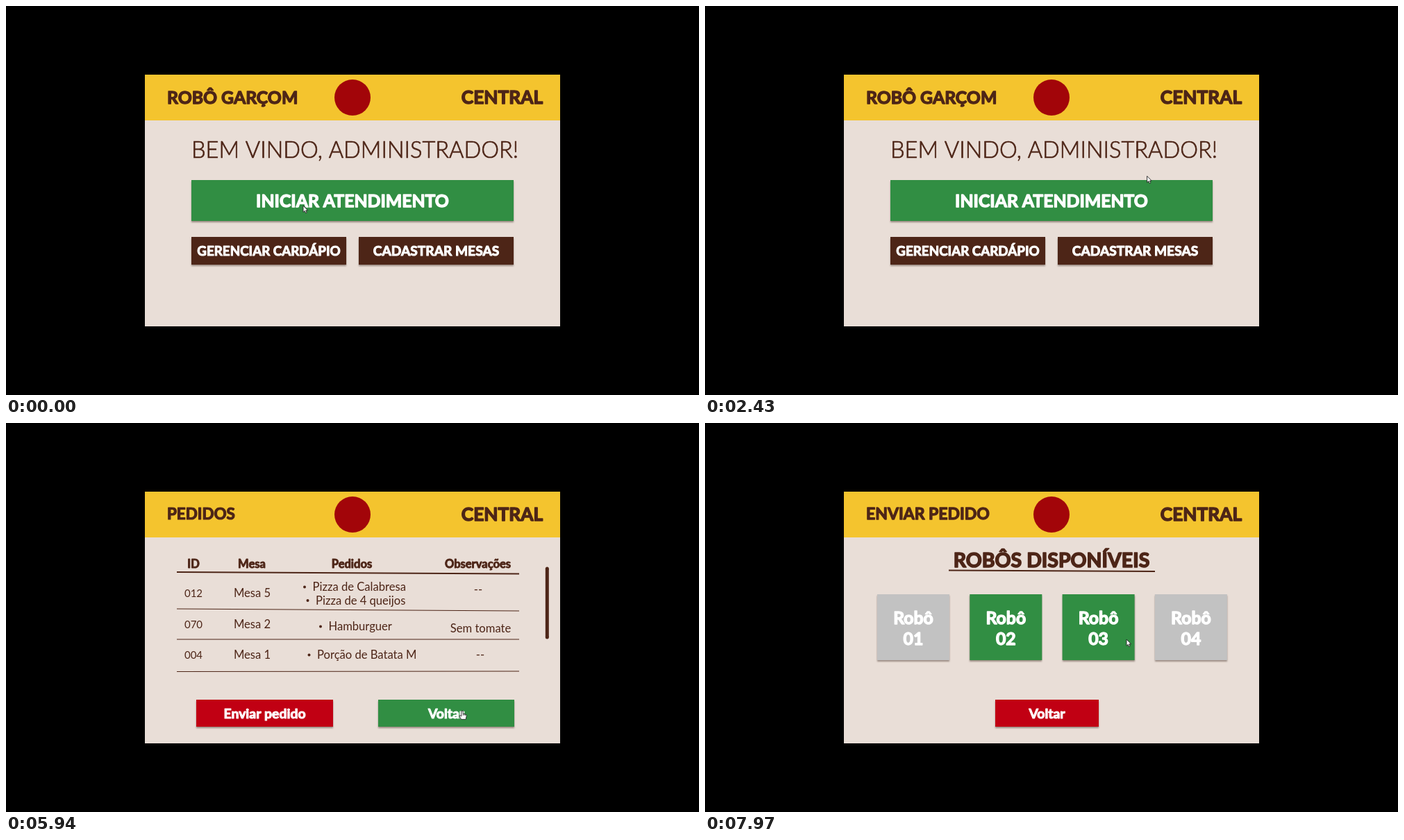
An HTML page with a canvas for the animation above (8 s loop, 998 by 561 pixels).

```html
<!DOCTYPE html>
<html lang="pt">
<head>
<meta charset="utf-8">
<title>Central</title>
<style>
html, body { margin: 0; width: 100%; height: 100%; overflow: hidden; background: #000; }
canvas { display: block; width: 100vw; height: 100vh; }
</style>
</head>
<body>
<canvas id="stage" width="998" height="561"></canvas>
<script>
const ctx = document.getElementById('stage').getContext('2d');
const LOOP = 8000, ORDERS_AT = 4000, ROBOTS_AT = 7460;
const GOLD = '#f4c42e', CREAM = '#e9ded7', GREEN = '#318e43', BROWN = '#4d2517',
      RED = '#c10013', GRAY = '#c2c2c2', DARK_RED = '#a20509', WHITE = '#fff';

// Places where the pointer rests or turns; it eases between them
const STOPS = [
  { t: 300, x: 428, y: 288 },
  { t: 1400, x: 937, y: 167 },
  { t: 3100, x: 480, y: 286 },
  { t: 4600, x: 477, y: 286 },
  { t: 5900, x: 657, y: 415 },
  { t: 6300, x: 657, y: 415 },
  { t: 7350, x: 402, y: 420 },
  { t: 7550, x: 402, y: 420 },
  { t: 7970, x: 607, y: 312 }
];

function bold(str, x, y, size, color = BROWN, align = 'center') {
  ctx.font = `700 ${size}px Lato, sans-serif`;
  ctx.textAlign = align;
  ctx.fillStyle = ctx.strokeStyle = color;
  ctx.lineWidth = size * 0.055;
  ctx.lineJoin = 'round';
  ctx.strokeText(str, x, y);
  ctx.fillText(str, x, y);
}

function plain(str, x, y, align = 'center', size = 16.6) {
  ctx.font = `400 ${size}px Lato, sans-serif`;
  ctx.textAlign = align;
  ctx.fillStyle = BROWN;
  ctx.fillText(str, x, y);
}

function box(x, y, w, h, color) {
  ctx.save();
  ctx.shadowColor = 'rgba(60, 40, 30, .45)';
  ctx.shadowBlur = 2;
  ctx.shadowOffsetY = 2;
  ctx.fillStyle = color;
  ctx.fillRect(x, y, w, h);
  ctx.restore();
}

function button(label, x, y, w, h, color, size = 19.4) {
  box(x, y, w, h, color);
  bold(label, x + w / 2, y + h / 2 + size * 0.37, size, WHITE);
}

function line(x1, y1, x2, y2, width) {
  ctx.strokeStyle = BROWN;
  ctx.lineWidth = width;
  ctx.beginPath();
  ctx.moveTo(x1, y1);
  ctx.lineTo(x2, y2);
  ctx.stroke();
}

function dot(x, y, r, color) {
  ctx.fillStyle = color;
  ctx.beginPath();
  ctx.arc(x, y, r, 0, Math.PI * 2);
  ctx.fill();
}

function frame(title, size, baseline) {
  ctx.fillStyle = '#000';
  ctx.fillRect(0, 0, 998, 561);
  ctx.fillStyle = CREAM;
  ctx.fillRect(200, 99, 598, 363);
  ctx.fillStyle = GOLD;
  ctx.fillRect(200, 99, 598, 66);
  dot(499, 132, 26, DARK_RED);
  bold(title, 232, baseline, size, BROWN, 'left');
  bold('CENTRAL', 714.5, 141, 26.3);
}

function welcome(str, x, y) {
  ctx.font = '300 32.6px Lato, sans-serif';
  ctx.textAlign = 'center';
  ctx.fillStyle = ctx.strokeStyle = BROWN;
  ctx.lineWidth = 0.7;
  ctx.fillText(str, x, y);
  ctx.strokeText(str, x, y);
}

function home() {
  frame('ROBÔ GARÇOM', 24.8, 141);
  welcome('BEM VINDO, ADMINISTRADOR!', 502.5, 219);
  button('INICIAR ATENDIMENTO', 267, 251, 464, 59, GREEN, 24.8);
  button('GERENCIAR CARDÁPIO', 267, 333, 223, 40, BROWN, 18.8);
  button('CADASTRAR MESAS', 508, 333, 223, 40, BROWN, 19.2);
}

function row(id, table, y) {
  plain(id, 270, y, 'center', 15);
  plain(table, 354.5, y);
}

function item(str, x, y) {
  dot(x - 11.5, y - 5.5, 2, BROWN);
  plain(str, x, y, 'left');
}

function orders() {
  frame('PEDIDOS', 22.4, 139);
  bold('ID', 270, 208.5, 16.5);
  bold('Mesa', 354, 208.5, 16.5);
  bold('Pedidos', 498, 208.5, 16.5);
  bold('Observações', 679.5, 208.5, 16.5);
  line(246, 215, 739, 217.5, 2);
  line(246, 268, 739, 271, 1.2);
  line(246, 312, 739, 312, 1.2);
  line(246, 358.5, 739, 358, 1.2);

  row('012', 'Mesa 5', 251);
  item('Pizza de Calabresa', 441.5, 242);
  item('Pizza de 4 queijos', 446, 261.5);
  plain('--', 680, 246);

  row('070', 'Mesa 2', 296);
  item('Hamburguer', 464.5, 299);
  plain('Sem tomate', 683.5, 302);

  row('004', 'Mesa 1', 340);
  item('Porção de Batata M', 448, 340);
  plain('--', 683, 340);

  line(779.3, 210, 779.3, 309, 5);
  dot(779.3, 210, 2.5, BROWN);
  dot(779.3, 309, 2.5, BROWN);

  button('Enviar pedido', 274, 399, 197, 39, RED);
  button('Voltar', 536, 399, 196, 39, GREEN);
}

function robots() {
  frame('ENVIAR PEDIDO', 23, 139);
  bold('ROBÔS DISPONÍVEIS', 499, 208, 28.5);
  line(351, 212.5, 648, 214, 2);
  for (let i = 0; i < 4; i++) {
    const x = 248 + i * 133.3, busy = i % 3 === 0;
    box(x, 247, 104, 95, busy ? GRAY : GREEN);
    bold('Robô', x + 52, 289.5, 24.8, WHITE);
    bold('0' + (i + 1), x + 52, 319.5, 24.8, WHITE);
  }
  button('Voltar', 418, 399, 149, 39, RED);
}

function pointer(t) {
  const i = STOPS.findIndex(s => s.t > t);
  if (i <= 0) return i ? STOPS[STOPS.length - 1] : STOPS[0];
  const a = STOPS[i - 1], b = STOPS[i];
  const u = (t - a.t) / (b.t - a.t), k = u * u * (3 - 2 * u);
  return { x: a.x + (b.x - a.x) * k, y: a.y + (b.y - a.y) * k };
}

function overButton(t, { x, y }) {
  const inside = (l, top, w, h) => x > l && x < l + w && y > top && y < top + h;
  if (t < ORDERS_AT) return t > 1400 && inside(267, 251, 464, 59);
  if (t < ROBOTS_AT) return inside(274, 399, 197, 39) || inside(536, 399, 196, 39);
  return false;
}

const ARROW = new Path2D('M0 0V9.4L2.2 7.4L3.6 10.6L5.2 9.9L3.8 6.8H6.6Z');
const HAND = new Path2D('M-1.2 .6Q0 -.8 1.2 .6V4.4L5 5.2Q6.4 5.6 6.2 7.4L5.2 12.4H-1.4L-4 8Q-4.6 6.6 -3.2 6.6L-1.2 8Z');
const FINGERS = new Path2D('M1.2 4.4V7M2.9 5V7M4.5 5.4V7.2');

function drawPointer(t) {
  const at = pointer(t), hand = overButton(t, at);
  const shape = hand ? HAND : ARROW;
  ctx.save();
  ctx.translate(at.x, at.y);
  ctx.lineJoin = 'round';
  ctx.lineWidth = 0.9;
  ctx.strokeStyle = '#222';
  ctx.fillStyle = WHITE;
  ctx.fill(shape);
  ctx.stroke(shape);
  if (hand) {
    ctx.lineWidth = 0.6;
    ctx.stroke(FINGERS);
  }
  ctx.restore();
}

function draw() {
  const t = performance.now() % LOOP;
  const page = t < ORDERS_AT ? home : t < ROBOTS_AT ? orders : robots;
  page();
  drawPointer(t);
  requestAnimationFrame(draw);
}
draw();
</script>
</body>
</html>
```
